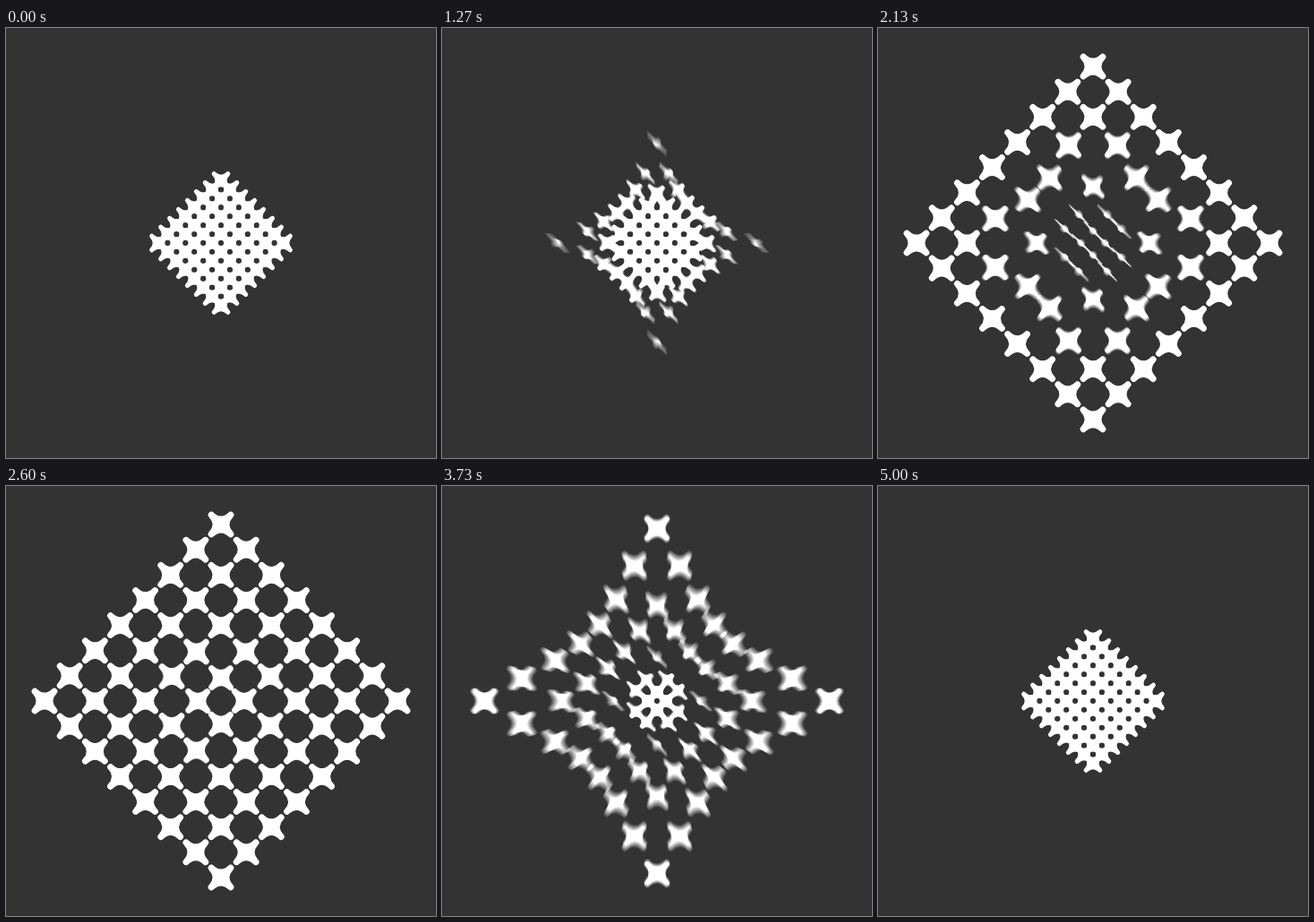
Write an HTML page with a canvas that moves like this. It is 480x480 px and loops after 5070 ms.

```html
<!DOCTYPE html>
<html>
<head>
<meta charset="utf-8">
<style>
  html, body { margin: 0; width: 100%; height: 100%; overflow: hidden; background: #333; }
  canvas { display: block; width: 100vmin; height: 100vmin; }
</style>
</head>
<body>
<canvas id="stage" width="480" height="480"></canvas>
<script>
const ctx = document.getElementById('stage').getContext('2d');
const LOOP = 5070, FRAME = LOOP / 76;
const TIGHT = 9.93, WIDE = 28.14, SMALL = 0.72;
const SAMPLES = 8, SHUTTER = 50;

// Squared distance from the centre: [middle of opening, middle of closing], ms
const MIDDLES = {
  1: [2270, 3288], 5: [2175, 3575], 9: [1984, 3720],
  13: [1870, 3775], 17: [1727, 3815], 25: [1575, 3869],
  29: [1508, 3916], 37: [1440, 4010], 49: [1310, 4152]
};

const stars = [];
for (let i = 0; i < 8; i++) {
  for (let j = 0; j < 8; j++) {
    const x = i - j, y = i + j - 7, dist = Math.hypot(x, y);
    const [open, close] = MIDDLES[x * x + y * y];
    stars.push({ x, y, open, close,
      openTime: dist > 6.5 ? 1200 : 1050,
      closeTime: 500 + 75 * dist });
  }
}

// Four rounded tips on the axes, joined by concave sides
const star = new Path2D();
for (let k = 0; k < 4; k++) {
  const a = k * Math.PI / 2, mid = a + Math.PI / 4;
  star.arc(15.3 * Math.cos(a), 15.3 * Math.sin(a), 3.5, a - Math.PI / 2, a + Math.PI / 2);
  const next = a + Math.PI / 2;
  star.quadraticCurveTo(5.5 * Math.cos(mid), 5.5 * Math.sin(mid),
    15.3 * Math.cos(next) + 3.5 * Math.cos(a), 15.3 * Math.sin(next) + 3.5 * Math.sin(a));
}
star.closePath();

function ease(time, middle, duration) {
  const t = Math.min(1, Math.max(0, (time - middle) / duration + 0.5));
  return (1 - Math.cos(Math.PI * t)) / 2;
}

function drawStars(time) {
  for (const s of stars) {
    const p = Math.max(0, ease(time, s.open, s.openTime) - ease(time, s.close, s.closeTime));
    const step = TIGHT * (WIDE / TIGHT) ** p;
    const size = SMALL ** (1 - p);
    const flip = Math.cos(Math.PI * p ** 0.7);
    ctx.setTransform(1, 0, 0, 1, 240 + s.x * step, 240 + s.y * step);
    ctx.rotate(Math.PI / 4);
    ctx.scale(size, size * Math.max(0.12, Math.abs(flip)));
    ctx.fill(star);
  }
}

function draw(now) {
  const time = Math.floor((now % LOOP + 5) / FRAME) * FRAME;
  ctx.setTransform(1, 0, 0, 1, 0, 0);
  ctx.globalCompositeOperation = 'source-over';
  ctx.fillStyle = '#333';
  ctx.fillRect(0, 0, 480, 480);
  // Motion blur: add up several moments within the shutter time
  ctx.globalCompositeOperation = 'lighter';
  ctx.fillStyle = 'rgb(26, 26, 26)';
  for (let k = 0; k < SAMPLES; k++) {
    drawStars(time + ((k + 0.5) / SAMPLES - 0.5) * SHUTTER);
  }
}

function tick() {
  draw(performance.now());
  requestAnimationFrame(tick);
}
tick();
</script>
</body>
</html>
```
